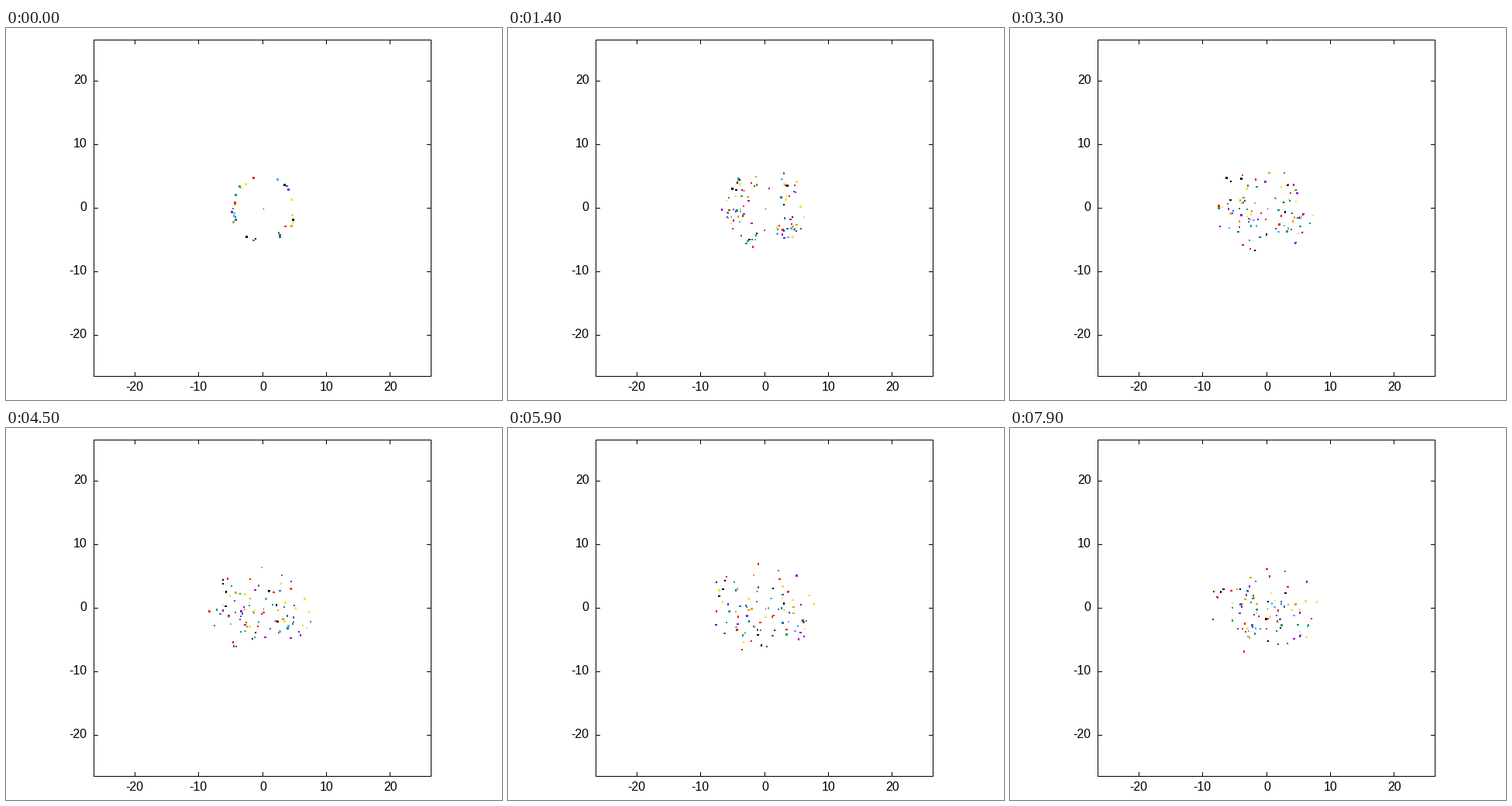
These frames come from a looping animation (640x480 px, 8000 ms). A matplotlib script:

```python
import numpy as np
import matplotlib.pyplot as plt
from matplotlib.animation import FuncAnimation

W, H, DPI = 640, 480, 100
PX = 72 / DPI                      # one pixel in points
FRAMES, HOLD = 80, 3               # frames in a loop, extra frames at rest
LEFT, RIGHT, TOP, BOTTOM = 113, 548, 15, 449
CENTER = np.array([331.5, 232.5])
UNIT = 8.21                        # pixels per axis unit
TICK = 5

PALETTE = {"p": "#9400d3", "g": "#009e73", "s": "#56b4e9", "o": "#e69f00",
           "y": "#f0e442", "b": "#0072b2", "r": "#e51e10", "k": "#000000"}

# where the walkers begin, in pixels, with the colour lying on top
STARTS = [
    (319, 193, "r"), (350, 195, "s"), (309, 201, "y"), (301, 204, "g"),
    (302.4, 205.4, "o"), (296, 215, "g"), (295, 225, "r"), (295, 227.4, "o"),
    (292.6, 232.4, "g"), (291, 237, "p"), (294, 238.4, "s"), (294, 242, "s"),
    (295.4, 243.4, "b"), (296, 247, "b"), (293, 250, "o"), (310, 269, "k"),
    (319, 273.4, "g"), (321.4, 271.4, "k"), (353, 269, "b"), (353, 266.4, "r"),
    (351.4, 264, "g"), (360, 255.4, "r"), (368, 255, "o"), (370, 250.4, "y"),
    (370, 247, "k"), (369, 241, "y"), (368, 221, "y"), (364, 208, "p"),
    (362, 203.4, "b"), (359, 202, "k"),
]
GROUP = 3                          # walkers sharing one start


def walk(start, steps, rng):
    """Uniform random steps with a faint pull inward, kept in a slowly growing oval."""
    path = [start]
    for t in range(1, steps):
        pos = path[-1]
        step = rng.uniform(-0.5, 0.5, pos.shape) * UNIT
        new = pos + step - 0.001 * pos
        reach = np.array([47 + 3.5 * np.sqrt(t), min(64, 47 + 4 * np.sqrt(t))])
        out = ((new / reach) ** 2).sum(axis=1) > 1
        new[out] = pos[out] - np.sign(pos[out]) * abs(step[out]) * 0.5
        path.append(new)
    return np.array(path)


rng = np.random.default_rng(12)
begin = np.array([(x + 0.5, y + 0.5) for x, y, _ in STARTS]) - CENTER
paths = walk(np.tile(begin, (GROUP, 1)), FRAMES - HOLD, rng) + CENTER
under = rng.choice(list(PALETTE), len(STARTS) * (GROUP - 1))
colors = [PALETTE[c] for c in [*under, *(s[2] for s in STARTS)]]

fig = plt.figure(figsize=(W / DPI, H / DPI), dpi=DPI, facecolor="white")
ax = fig.add_axes([0, 0, 1, 1])
ax.set(xlim=(0, W), ylim=(H, 0))
ax.axis("off")


def line(x0, y0, x1, y1):
    """Whole-pixel line; snapping moves it onto the pixel centres."""
    ax.plot([x0, x1], [y0, y1], color="black", lw=PX, antialiased=False,
            solid_capstyle="butt", zorder=3)


def label(x, y, text, align):
    ax.text(x, y, text, ha=align, va="baseline", family="Liberation Sans",
            size=16 * PX, color="black")


for y in (TOP, BOTTOM):
    line(LEFT, y, RIGHT, y)
for x in (LEFT, RIGHT):
    line(x, TOP, x, BOTTOM)

for value in range(-20, 21, 10):
    x = round(330.6 + value * 8.22)
    y = round(232 - value * 8.2)
    line(x, BOTTOM, x, BOTTOM - TICK)
    line(x, TOP, x, TOP + TICK)
    line(LEFT, y, LEFT + TICK, y)
    line(RIGHT, y, RIGHT - TICK, y)
    label(x + (1 if value >= 0 else -0.5), 468, str(value), "center")
    label(104.5, y + 4, str(value), "right")


def squares(points, size, color):
    return ax.scatter(*points.T, s=(size * PX) ** 2, c=color, marker="s", lw=0,
                      antialiased=False, snap=False, zorder=4)


squares(CENTER[None], 1, "black")
dots = squares(paths[0], 1.4, colors)


def draw(i):
    dots.set_offsets(paths[max(0, i - HOLD)])
    return [dots]


anim = FuncAnimation(fig, draw, frames=FRAMES, interval=100, repeat=True)
plt.show()
```
